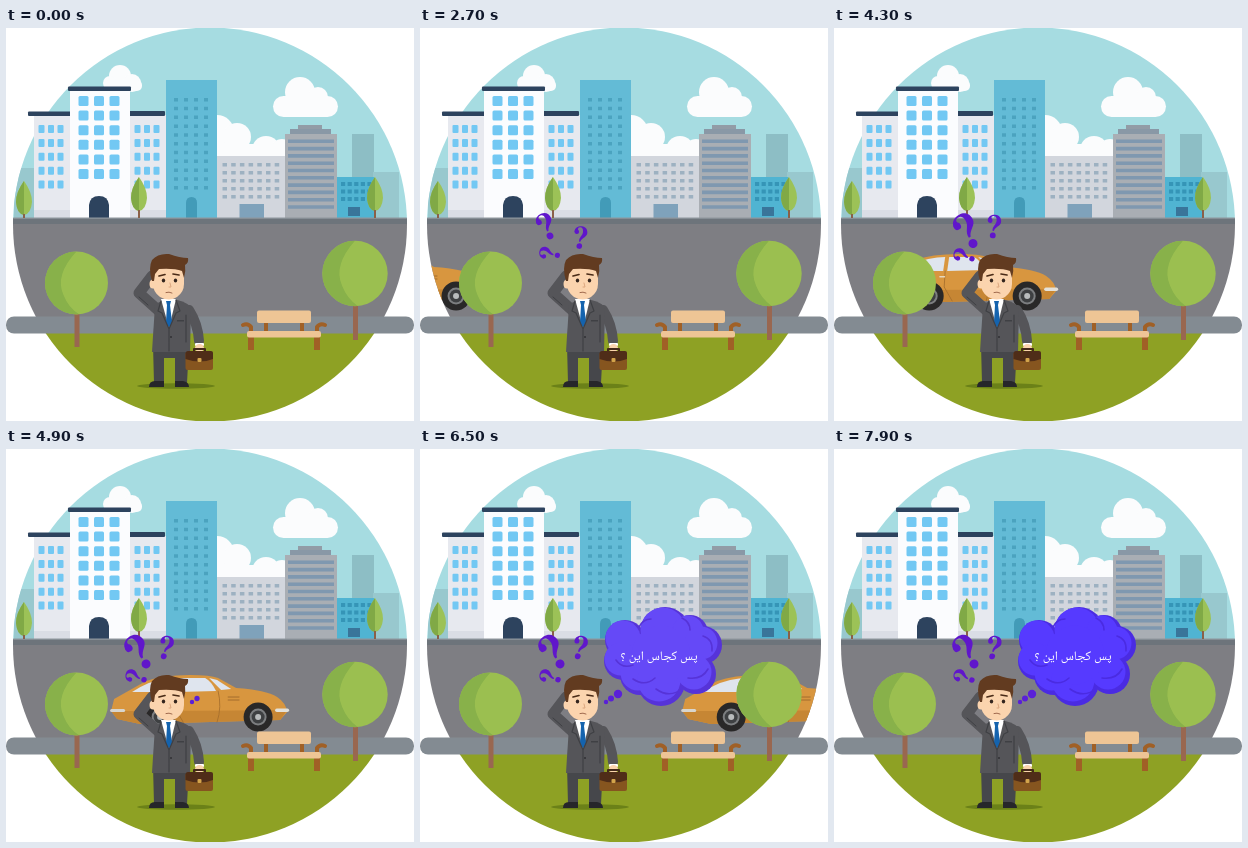
Write an HTML page with a canvas that moves like this. It is 408 px wide and 393 px high and loops after 8 s.

```html
<!DOCTYPE html>
<html lang="fa">
<head>
<meta charset="utf-8">
<title>Where is it?</title>
<style>
html, body { margin: 0; width: 100%; height: 100%; overflow: hidden; background: #fff; }
canvas { display: block; width: 408px; height: 393px; }
</style>
</head>
<body>
<canvas id="stage"></canvas>
<script>
const W = 408, H = 393, LOOP = 8000;
const canvas = document.getElementById('stage');
const dpr = window.devicePixelRatio || 1;
canvas.width = W * dpr;
canvas.height = H * dpr;
const g = canvas.getContext('2d');

const clamp = v => Math.max(0, Math.min(1, v));
const prog = (t, a, b) => clamp((t - a) / (b - a));
const mix = (a, b, p) => a + (b - a) * p;
const easeOut = p => 1 - Math.pow(1 - p, 3);
const backOut = p => 1 + 2.2 * Math.pow(p - 1, 3) + 1.2 * Math.pow(p - 1, 2);

function rect(color, x, y, w, h, r = 0) {
  g.fillStyle = color;
  g.beginPath();
  g.roundRect(x, y, w, h, r);
  g.fill();
}
function oval(color, x, y, rx, ry = rx) {
  g.fillStyle = color;
  g.beginPath();
  g.ellipse(x, y, rx, ry, 0, 0, 7);
  g.fill();
}
function shape(color, d) {
  g.fillStyle = color;
  g.fill(new Path2D(d));
}
function line(color, width, d) {
  g.strokeStyle = color;
  g.lineWidth = width;
  g.lineCap = g.lineJoin = 'round';
  g.stroke(new Path2D(d));
}
function windows(color, x, y, cols, rows, dx, dy, w, h, r = 0) {
  for (let i = 0; i < cols; i++)
    for (let j = 0; j < rows; j++) rect(color, x + i * dx, y + j * dy, w, h, r);
}
function inCircle(paint) {
  g.save();
  g.beginPath();
  g.arc(204, 196.5, 197, 0, 7);
  g.clip();
  paint();
  g.restore();
}

function sky() {
  const cloud = '#fbfcfd';
  rect('#a6dce1', 0, 0, W, 191);
  oval(cloud, 114, 48, 11); oval(cloud, 104, 55, 7); oval(cloud, 126, 55, 9);
  rect(cloud, 98, 52, 38, 11, 5);
  oval(cloud, 294, 64, 15); oval(cloud, 312, 69, 10);
  rect(cloud, 267, 68, 65, 21, 10.5);
  oval(cloud, 211, 104, 17); oval(cloud, 231, 109, 14);
  oval(cloud, 260, 122, 14); oval(cloud, 276, 122, 11);
  rect(cloud, 207, 116, 73, 16);
  // distant blocks
  rect('#8dbec5', 346, 106, 22, 84);
  rect('#98c8ce', 367, 144, 26, 46);
  rect('#98c8ce', 8, 140, 20, 50);
}

function whiteComplex() {
  const navy = '#2d435e', glass = '#72c8f3', wing = '#e7e9ef';
  rect(wing, 28, 87, 36, 103);
  rect(wing, 123, 87, 37, 103);
  rect(navy, 22, 83.5, 43, 4.5, 1);
  rect(navy, 122, 83, 37, 5, 1);
  windows(glass, 32.5, 97, 3, 5, 9.5, 13.9, 6, 8, 1);
  windows(glass, 128.5, 97, 3, 5, 9.5, 13.9, 6, 8, 1);
  rect('#fbfcfe', 64, 62, 60, 128);
  rect(navy, 62, 58.5, 63, 4.5, 1);
  windows(glass, 72.5, 68, 3, 6, 15.5, 14.6, 10, 10, 1.5);
  rect('#dadde5', 28, 182, 36, 8);
  rect('#dadde5', 124, 182, 36, 8);
  shape(navy, 'M83 190V177Q84 168 93 168T103 177V190Z');
}

function otherBlocks() {
  // teal tower
  rect('#63bbd6', 160, 52, 51, 138);
  windows('#4ba3bf', 168, 70, 4, 11, 10, 8.8, 4, 3.5);
  shape('#429bb8', 'M180 190V175Q180 169 185.5 169T191 175V190Z');

  // pale office
  rect('#d2d6dd', 211, 128, 68, 62);
  windows('#9db1c1', 216.5, 135, 7, 5, 8.7, 8, 4.5, 3.5);
  rect('#7fa2bb', 233.5, 176, 24.5, 14);

  // striped block
  rect('#929ca6', 292, 97, 24, 5);
  rect('#8998a6', 284, 101, 41, 5);
  rect('#a9aeb4', 279, 106, 52, 84);
  for (let i = 0; i < 10; i++) rect('#7f98b0', 282, 111.5 + i * 7.3, 46, 3.6);

  // small teal office
  rect('#50b4d2', 331, 149, 37, 41);
  windows('#3595b7', 335, 154, 5, 3, 6.6, 7.5, 4.2, 4);
  rect('#39759a', 342, 179, 12, 9);
}

function sapling(x, y) {
  shape('#9cc257', `M${x} ${y - 17}Q${x + 8} ${y - 6} ${x + 8} ${y + 4}Q${x + 7} ${y + 16} ${x} ${y + 17}Q${x - 7} ${y + 16} ${x - 8} ${y + 4}Q${x - 8} ${y - 6} ${x} ${y - 17}Z`);
  shape('#80a946', `M${x} ${y - 17}Q${x - 8} ${y - 6} ${x - 8} ${y + 4}Q${x - 7} ${y + 16} ${x} ${y + 17}Z`);
  rect('#8a6048', x - 1, y + 16, 2, 174 - y);
}

function ground() {
  rect('#7e7e83', 0, 190, W, 100);
  rect('#6d747b', 0, 190, W, 6);
  rect('#8f979e', 0, 189.5, W, 1.2);
  rect('#8ea124', 0, 304, W, 90);
}

function wheel(x) {
  oval('#292828', x, 268, 14.5);
  oval('#7c7e80', x, 268, 8.5);
  oval('#3e4042', x, 268, 6.5);
  oval('#b9bcbd', x, 268, 3);
}

function car(t) {
  const x = 154 + (t - 4900) * 0.0982;
  if (x < -125 || x > 455) return;
  g.save();
  g.translate(x, 0);
  shape('#d8963f', 'M-49 262L-46 250Q-30 241 -14 232Q2 226 30 226Q50 226 58 229L76 239Q106 241 117 248Q126 254 127 263L120 271L-20 275L-43 270Z');
  shape('#c68634', 'M-49 262Q20 262 127 261L120 271L-20 275L-43 270Z');
  const glass = '#dfe5ee';
  shape(glass, 'M-28 243Q-10 231 8 229.500L16 229L14 243Z');
  shape(glass, 'M18 243L20 229H45Q51 232 56 242Z');
  shape(glass, 'M49 229L57 231L71 240L61 241Z');
  line('#a36d2c', .8, 'M16 243L15 259L23 273M58 242Q62 258 57 273');
  line('#a36d2c', 1, 'M68 248H79M68 251H79');
  rect('#e6d8bf', 10, 248, 6, 1.5, .7);
  rect('#d8d5cd', -50, 260, 15, 3, 1.5);
  rect('#e4e1d8', 115, 259.5, 14, 3.5, 1.7);
  wheel(0);
  wheel(98);
  g.restore();
}

function tree(x, y, r, foot) {
  rect('#996750', x - 2, y + r - 3, 5, foot - y - r + 3);
  oval('#9bbf50', x, y, r);
  g.save();
  g.beginPath();
  g.arc(x, y, r, 0, 7);
  g.clip();
  shape('#88b14a', `M${x} ${y - r}Q${x - 22} ${y - 8} ${x - 13} ${y + 12}Q${x - 8} ${y + 25} ${x + 3} ${y + r}H${x - r}V${y - r}Z`);
  g.restore();
}

function bench() {
  const wood = '#eec595', frame = '#a06026';
  rect(frame, 258, 292, 4, 14);
  rect(frame, 294, 292, 4, 14);
  rect(wood, 251, 282.5, 54, 12.5, 2);
  line(frame, 4, 'M237 297Q242 295 245 299V306M319 297Q314 295 311 299V306');
  rect(frame, 242, 307, 6, 15);
  rect(frame, 308, 307, 6, 15);
  rect(wood, 241, 303, 74, 6.5, 2);
}

function man() {
  const suit = '#555559', dark = '#3f4044', skin = '#fbd4ae';
  oval('#6b8118', 170, 358, 39, 2.8);
  // raised arm
  line(suit, 11, 'M153 283L133 265L146 248');
  line(dark, 1, 'M142 277L133 269');
  // legs
  shape('#46474b', 'M147 317H183L181 355H169V330H158V355H148Z');
  shape('#26262a', 'M143 359Q143 353 149 353H158V359ZM169 359V353H177Q183 354 183 359Z');
  // hanging arm and torso
  line(suit, 10, 'M183 282Q192 296 193 313');
  rect('#fff', 189, 315, 9, 3, 1);
  oval(skin, 193.5, 320, 4.5, 4);
  shape(suit, 'M149 277Q156 271 165 271Q178 272 185 279L184 324H146Z');
  shape('#fff', 'M155 271H170L163 300Z');
  shape('#1463ae', 'M160 273H165L164 277L166 294L163 300L160 294L161 277Z');
  line(dark, 1.2, 'M155 273L152 283L156 285L163 301L170 285L174 283L170 272M163 301V323M180 287V314');
  rect(dark, 171, 292, 7, 1.5);
  oval('#303034', 165, 309, 1);
  // head
  oval(skin, 147, 256, 3.5, 4.5);
  shape(skin, 'M147 238H178V256Q178 264 171 269Q163 274 154 269Q147 264 147 256Z');
  shape('#623b20', 'M146 253Q142 240 146 232Q152 225 163 226Q174 230 182 230Q183 235 179 237Q180 243 178 250L176 243Q168 240 153 241L149 246L148 253Z');
  line('#4a2b17', 1.7, 'M153 248L159 246.500M167 246L173 247');
  oval('#34251e', 157.5, 252.5, 1.7, 2);
  oval('#34251e', 169.5, 252.5, 1.7, 2);
  line('#dca77f', 1, 'M164 255L165 259H163');
  line('#a06a4e', 1, 'M160 264.500Q163 263.500 166 265');
  // briefcase
  line('#43291a', 2, 'M188 325V321H199V325');
  rect('#86551f', 179.5, 324, 27.5, 18, 2);
  shape('#4f2d18', 'M179.500 325Q180 323 182 323H205Q207 323 207 325V331Q194 336 179.500 331Z');
  rect('#d3a44b', 191.5, 330, 4, 4, 1);
}

// Each mark: keys of [x, y, size, degrees] on its way out of the head.
const marks = [
  { from: [143, 232, 0, -50], mid: [126, 199, 30, -24], end: [133, 204, 40, -29], phase: 0 },
  { from: [153, 230, 0, 0], mid: [160, 210, 25, 5], end: [159.5, 199, 26, 9], phase: 2 },
  { from: [143, 234, 0, -90], mid: [130, 226, 23, -80], end: [130.5, 228.5, 24, -75], phase: 4 }
];
const hook = 'M-9.500 -9C-10 -16 -4 -19 1 -19C8 -19 11 -14 11 -9C11 -2 3 -1 1 6H-1C-2 -1 4 -4 4 -10C4 -15 2 -17 -1 -17C-4 -17 -5 -15 -4 -12Z';
function questions(t) {
  if (t < 1900) return;
  const ink = '#6016cb';
  const a = easeOut(prog(t, 1900, 2700)), b = easeOut(prog(t, 2700, 3500));
  for (const m of marks) {
    const [x, y, size, deg] = m.from.map((v, i) => mix(mix(v, m.mid[i], a), m.end[i], b));
    const sway = 4 * b * Math.sin((t - 3600) / 255 + m.phase);
    g.save();
    g.translate(x, y);
    g.rotate((deg + sway) * Math.PI / 180);
    g.scale(size / 40, size / 40);
    shape(ink, hook);
    oval(ink, -6, -9.5, 3.7);
    oval(ink, 0, 13, 4.5);
    g.restore();
  }
}

const lobes = [
  [205, 191, 20], [245, 183, 25], [270, 184, 18], [283, 196, 19], [203, 212, 19],
  [220, 226, 20], [241, 233, 24], [276, 225, 20], [243, 208, 32]
];
const puffs = [[186, 253, 2.2], [191, 249.5, 3], [198, 245, 4.2]];

function thought(t) {
  const fade = prog(t, 6300, 7700);
  const light = `rgb(${mix(104, 86, fade)},${mix(75, 58, fade)},${mix(246, 255, fade)})`;
  const deep = `rgb(${mix(88, 74, fade)},${mix(52, 43, fade)},${mix(214, 226, fade)})`;
  puffs.forEach(([x, y, r], i) => {
    const p = easeOut(prog(t, 4350 + i * 350, 4750 + i * 350));
    if (p > 0) oval('#5a20d8', x, y, r * p);
  });
  const p = prog(t, 5800, 6350);
  if (!p) return;
  const s = Math.max(0, backOut(p));
  g.save();
  g.translate(200, 243);
  g.scale(s, s);
  g.translate(-200, -243);
  for (const [x, y, r] of lobes) oval(deep, x, y, r);
  for (const [x, y, r] of lobes) oval(light, x - 2, y - 2, r - 2.5);
  line(deep, 1.6, 'M219 178Q223 170 231 170M262 169Q270 173 270 181M283 187Q293 190 292 202M196 211Q202 220 213 216M213 230Q225 238 235 229M236 240Q250 250 263 239M268 229Q282 231 288 220');
  g.globalAlpha = prog(t, 6050, 6400);
  g.fillStyle = '#fff';
  g.font = '13px "Noto Naskh Arabic", "DejaVu Sans", sans-serif';
  g.textAlign = 'center';
  g.textBaseline = 'alphabetic';
  g.direction = 'rtl';
  g.fillText('پس کجاس این ؟', 239, 211);
  g.restore();
}

function draw(t) {
  g.setTransform(dpr, 0, 0, dpr, 0, 0);
  g.fillStyle = '#fff';
  g.fillRect(0, 0, W, H);
  inCircle(sky);
  whiteComplex();
  inCircle(() => {
    otherBlocks();
    ground();
    sapling(18, 170);
    sapling(133, 166);
    sapling(369, 166);
  });
  rect('#838b92', 0, 288.5, W, 17, 8);
  inCircle(() => car(t));
  tree(70.5, 255, 31.5, 319);
  tree(349, 245.5, 32.7, 312);
  bench();
  questions(t);
  man();
  thought(t);
}

const start = performance.now();
function frame() {
  draw((performance.now() - start) % LOOP);
  requestAnimationFrame(frame);
}
frame();
</script>
</body>
</html>
```
